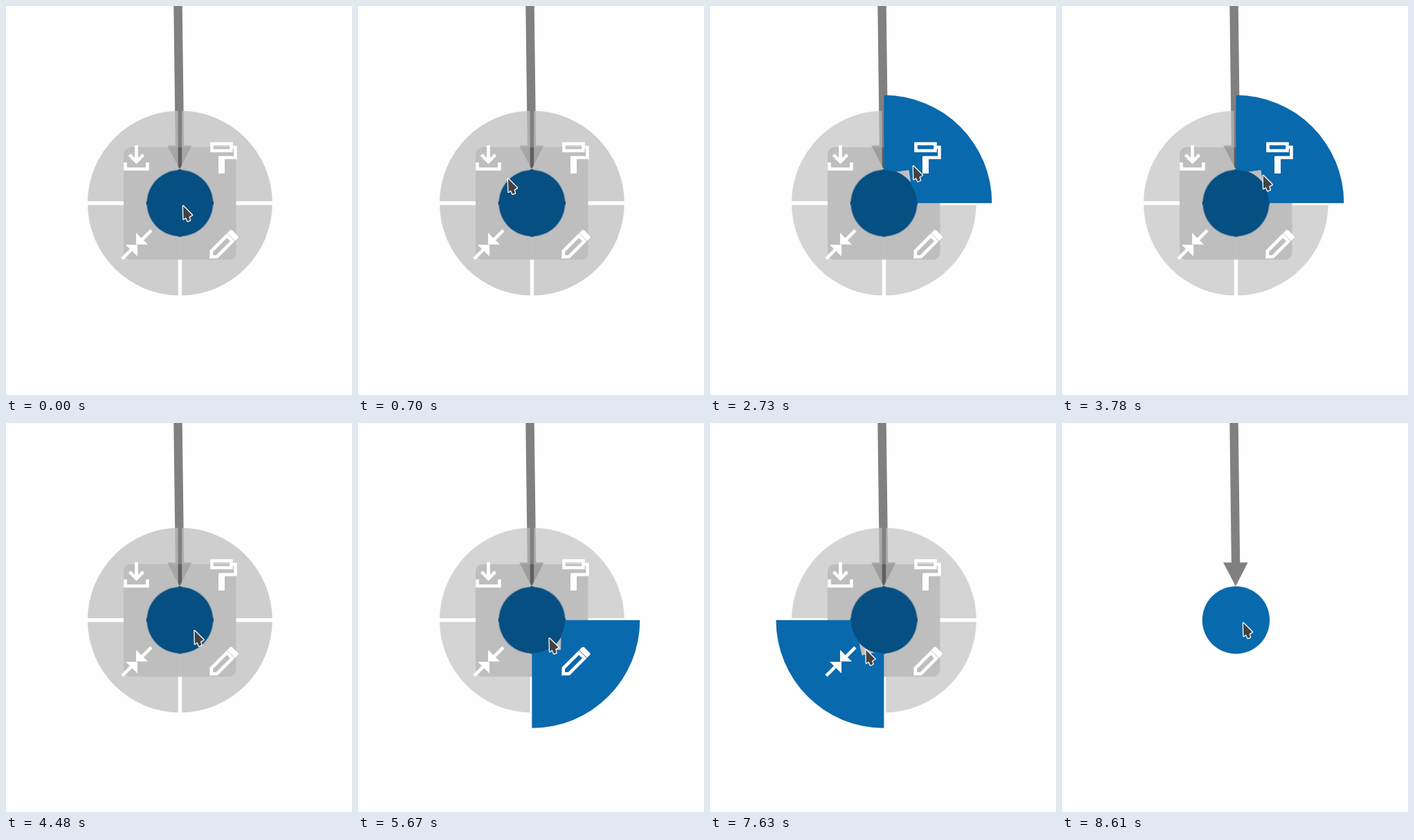
Recreate the animation shown at these times as an HTML page with a canvas. Size 500 by 562 pixels, loop 8.82 s.

```html
<!DOCTYPE html>
<html lang="en">
<head>
<meta charset="utf-8">
<title>Radial menu</title>
<style>
html, body { margin: 0; width: 100%; height: 100%; overflow: hidden; background: #fff; }
canvas { display: block; width: 500px; height: 562px; }
</style>
</head>
<body>
<canvas id="stage" width="500" height="562"></canvas>
<script>
const W = 500, H = 562, LOOP = 8820, STEP = 70, CLOSE = 8260;
const CX = 251.4, CY = 284.8, TAU = Math.PI * 2, QUARTER = Math.PI / 2;
const DISC = 133.5, SECTOR = 156, HUB = 47.5, NODE = 48.7;
const BLUE = '#0869ad', GREY = '#808080', WHITE = '#fff';

const ctx = document.getElementById('stage').getContext('2d');
const layer = document.createElement('canvas');
layer.width = W;
layer.height = H;
const menu = layer.getContext('2d');

// Each trip leaves its rest point, waits at (angle, reach) from the hub, then moves to the next rest point.
const trips = [
  { rest: [256, 288], angle: 226, reach: 66, go: 70, arrive: 980, leave: 1400, back: 2240 },
  { rest: [256, 288], angle: 307, reach: 88, go: 2240, arrive: 2940, leave: 3430, back: 4270 },
  { rest: [268, 293], angle: 46, reach: 59, go: 4270, arrive: 5040, leave: 5320, back: 6090 },
  { rest: [256, 288], angle: 122, reach: 51, go: 6230, arrive: 7000, leave: 7560, back: 8260 }
];
const lastRest = [262, 288];

function ease(t, from, to) {
  const p = Math.min(1, Math.max(0, (t - from) / (to - from)));
  return p * p * (3 - 2 * p);
}

const mix = (a, b, p) => a.map((v, i) => v + (b[i] - v) * p);
const radians = deg => deg * Math.PI / 180;
const tripAt = t => trips.findLast(trip => t >= trip.go) || trips[0];

function pointerAt(t) {
  const trip = tripAt(t), next = trips[trips.indexOf(trip) + 1];
  const a = radians(trip.angle);
  const end = [CX + trip.reach * Math.cos(a), CY + trip.reach * Math.sin(a)];
  const out = mix(trip.rest, end, ease(t, trip.go, trip.arrive));
  return mix(out, next ? next.rest : lastRest, ease(t, trip.leave, trip.back));
}

// The menu reacts two steps after the pointer.
function activeAngle(t) {
  const seen = t - 2 * STEP, [x, y] = pointerAt(seen);
  return Math.hypot(x - CX, y - CY) > 42 ? radians(tripAt(seen).angle) : null;
}

function trace(c, pts, closed) {
  c.beginPath();
  pts.forEach(p => c.lineTo(...p));
  if (closed) c.closePath();
}

function fillShape(c, pts, color) {
  trace(c, pts, true);
  c.fillStyle = color;
  c.fill();
}

function strokeLine(c, pts, width, color, closed) {
  trace(c, pts, closed);
  c.lineWidth = width;
  c.strokeStyle = color;
  c.stroke();
}

function disc(c, r, color) {
  c.beginPath();
  c.arc(CX, CY, r, 0, TAU);
  c.fillStyle = color;
  c.fill();
}

function place(c, x, y, angle, paint) {
  c.save();
  c.translate(x, y);
  c.rotate(angle);
  paint();
  c.restore();
}

function drawIcons(c) {
  const line = (pts, closed) => strokeLine(c, pts, 4.6, WHITE, closed);
  c.fillStyle = WHITE;
  // download
  place(c, 188.5, 225, 0, () => {
    line([[0, -24], [0, 0]]);
    line([[-10, -10], [0, 0], [10, -10]]);
    line([[-16, 1], [-16, 10.5], [16, 10.5], [16, 1]]);
  });
  // roller
  place(c, 311.5, 204, 0, () => {
    line([[-14, -5], [14, -5], [14, 5], [-14, 5]], true);
    line([[14, 0], [20, 0], [20, 15], [-2, 15]]);
    c.fillRect(-4.5, 13, 9, 25);
  });
  // collapse: two facing arrows
  for (const turn of [0, Math.PI]) {
    place(c, 189, 344.7, turn, () => {
      line([[-21, 20.5], [-5, 4.5]]);
      fillShape(c, [[1, 0.3], [-16, 0.3], [1, 17]], WHITE);
    });
  }
  // pencil
  place(c, 314, 345, -QUARTER / 2, () => {
    line([[-24.5, 0], [-18.5, -5.7], [13, -5.7], [13, 5.7], [-18.5, 5.7]], true);
    c.beginPath();
    c.roundRect(16, -8, 8, 16, [0, 3, 3, 0]);
    c.fill();
  });
}

function drawMenu(c, angle) {
  const active = angle !== null;
  c.clearRect(0, 0, W, H);
  disc(c, DISC, `rgba(190,190,190,${active ? 0.66 : 0.75})`);

  c.globalCompositeOperation = 'destination-out';
  for (const turn of [0, QUARTER]) {
    place(c, CX, CY, turn, () => strokeLine(c, [[-DISC - 2, 0], [DISC + 2, 0]], 5.5, '#000'));
  }

  if (active) {
    const a = Math.floor(angle / QUARTER) * QUARTER;
    c.globalCompositeOperation = 'source-over';
    c.beginPath();
    c.moveTo(CX, CY);
    c.arc(CX, CY, SECTOR, a, a + QUARTER);
    c.fillStyle = BLUE;
    c.fill();

    // notch pointing outwards
    c.globalCompositeOperation = 'destination-out';
    place(c, CX, CY, angle, () => {
      c.translate(43, 0);
      c.rotate(QUARTER / 2);
      c.fillRect(-12, -12, 24, 24);
    });
  }
  disc(c, HUB, '#000');
  c.globalCompositeOperation = 'source-over';
  drawIcons(c);
}

function drawPointer([x, y]) {
  const shape = [[0, 0], [0.5, 19], [4, 16.5], [6.5, 22], [10, 20.5], [8.5, 15.5], [13, 13]];
  place(ctx, x, y + 1, 0, () => {
    ctx.lineJoin = 'round';
    strokeLine(ctx, shape, 2.6, WHITE, true);
    fillShape(ctx, shape, '#424242');
  });
}

function draw(t) {
  ctx.fillStyle = '#fefefe';
  ctx.fillRect(0, 0, W, H);
  strokeLine(ctx, [[248.5, 0], [251, 202]], 12.4, GREY);
  fillShape(ctx, [[233, 201.5], [268.5, 201.5], [251, 236]], GREY);
  disc(ctx, NODE, BLUE);
  if (t < CLOSE) {
    ctx.beginPath();
    ctx.roundRect(170, 204, 162.5, 162.5, 10);
    ctx.fillStyle = 'rgba(0,0,0,0.25)';
    ctx.fill();
    drawMenu(menu, activeAngle(t));
    ctx.drawImage(layer, 0, 0);
  }
  drawPointer(pointerAt(t));
}

const start = performance.now();
function tick() {
  const t = (performance.now() - start) % LOOP;
  draw(Math.floor(t / STEP) * STEP);
  requestAnimationFrame(tick);
}
tick();
</script>
</body>
</html>
```
